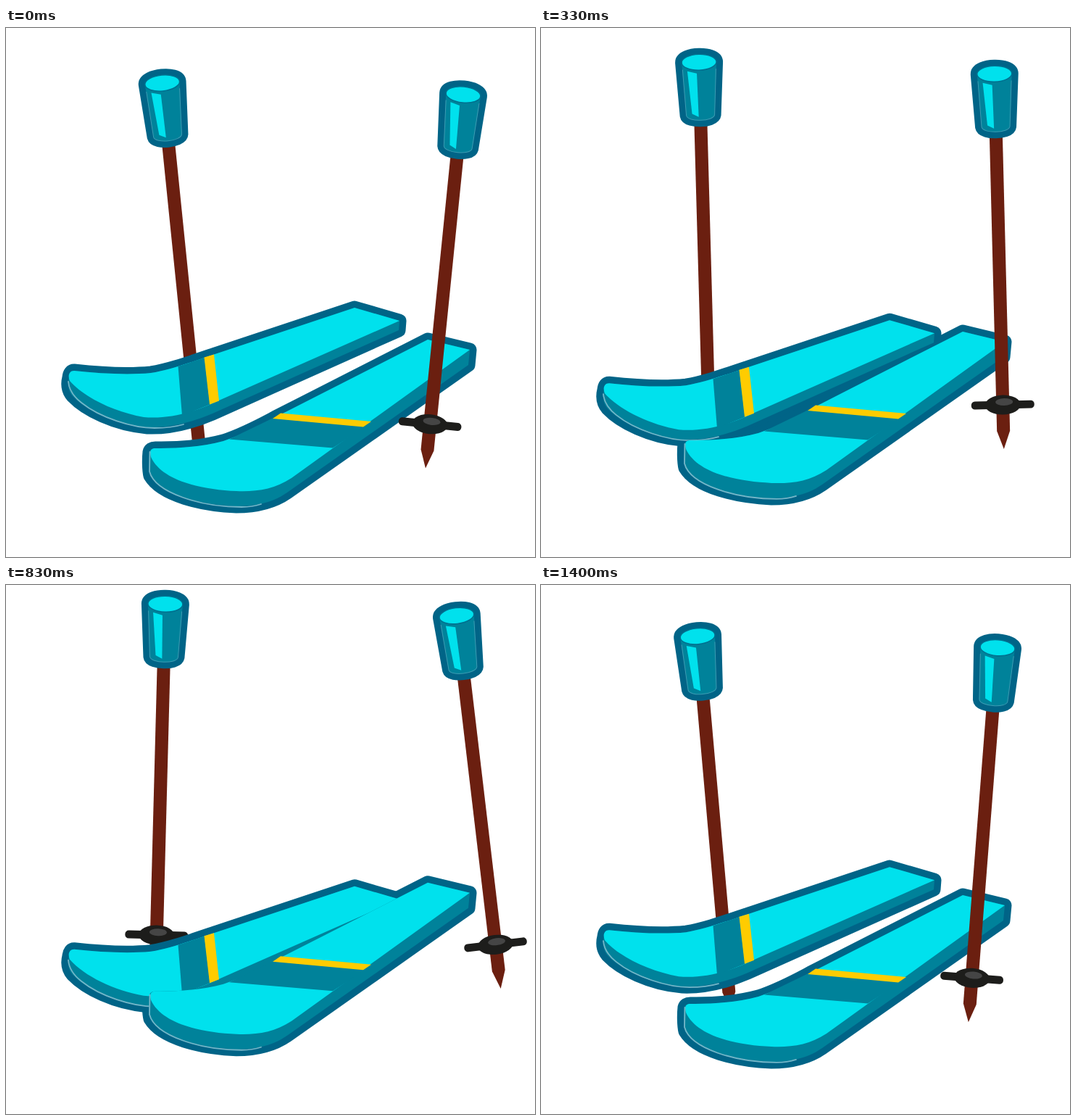
Write an HTML page that moves like this. It is 730 px wide and 730 px high and loops after 1.44 s.

```html
<!DOCTYPE html>
<html lang="en">
<head>
<meta charset="utf-8">
<title>Skis and poles</title>
<style>
  html, body { margin: 0; width: 100%; height: 100%; overflow: hidden; background: #fff; }
  svg { display: block; width: 100vw; height: 100vh; }
  .rim { fill: #006487; stroke: #006487; stroke-width: 19; stroke-linejoin: round; }
  .side { fill: #00829a; }
  .top { fill: #00e1ed; }
  .stripe { fill: #ffcc00; }
  .shine { fill: none; stroke: #74b6c8; stroke-width: 1.8; stroke-linecap: round; }
  .wood { fill: #6b1f10; }
  .basket { fill: #1d1d1b; }
</style>
</head>
<body>
<svg viewBox="0 0 730 730">
  <defs>
    <path id="bodyA" d="M94 473C130 477 170 479 200 476C225 472 250 463 290 449.500L481 386L543 404L542 417L285 532C250 547 220 552 195 551C150 547 110 527 92 508C85 500 85 490 87 482Q88 473 94 473Z"/>
    <path id="bodyB" d="M206 580C235 580.500 270 578 300 570C330 560 355 546 372 537L582 430L640 444L638 465L388 641C365 657 340 660 318 660C270 658 215 645 199 618C197 610 197 594 198 585Q199 580 206 580Z"/>
    <path id="grip" d="M-24 0C-24 -14 24 -14 24 0L19.500 73C18 82.500 -18 82.500 -19.500 73Z"/>

    <!-- upright pole, origin at the centre of the grip's top -->
    <g id="pole">
      <path class="wood" d="M-9 60H9V493L0 518L-9 493Z"/>
      <g class="basket">
        <rect x="-43.500" y="451.500" width="87" height="11" rx="5"/>
        <ellipse cy="457" rx="24.500" ry="13.500"/>
      </g>
      <ellipse cx="2" cy="453" rx="12" ry="5" fill="#454545"/>
      <use href="#grip" class="rim" style="stroke-width:18"/>
      <use href="#grip" class="side"/>
      <path class="shine" style="stroke:#3d9cb3;stroke-width:1" d="M-23 10L-19.500 73C-18 82.500 18 82.500 19.500 73L23 10"/>
      <ellipse class="top" rx="24" ry="11" stroke="#00708f" stroke-width="1.500"/>
      <path class="top" d="M-16.500 12L-3.500 15.500L-2.500 75.500L-11.500 71Z"/>
    </g>

    <g id="skiA">
      <use href="#bodyA" class="side"/>
      <path class="top" d="M94 473C130 477 170 479 200 476C225 472 250 463 290 449.500L481 386L543 404L287 517C255 532 220 540 190 537C150 530 108 510 88 487C85 480 87 473 94 473Z"/>
      <path class="side" d="M237.500 467L274 455L281.500 519.500L243 535Z"/>
      <path class="stripe" d="M273.500 454.500L287 450.500L294 514.500L281 519.500Z"/>
      <path class="shine" d="M86 488C87 500 95 510 104 517C130 538 175 552 205 552Q228 552 245 547"/>
    </g>

    <g id="skiB">
      <use href="#bodyB" class="side"/>
      <path class="top" d="M206 580C235 580.500 270 578 300 570C330 560 355 546 372 537L582 430L640 444L394 621C370 637 345 640 318 639C270 637 215 625 200 592C198 585 199 580 206 580Z"/>
      <path class="side" d="M308 567.500L368 538.500L496 550L451 579.500Z"/>
      <path class="stripe" d="M368 539L379 531.500L504 543L493 550.500Z"/>
      <path class="shine" d="M198.500 585L198 612C206 642 270 661 325 661Q340 661 352 657"/>
    </g>
  </defs>

  <use href="#pole" id="poleA"/>
  <g class="rim">
    <use href="#bodyA" class="a"/>
    <use href="#bodyB" class="b"/>
  </g>
  <use href="#skiA" class="a"/>
  <use href="#skiB" class="b"/>
  <use href="#pole" id="poleB"/>
</svg>
<script>
  const LOOP = 1440, STEP = 100 / 3, LAST = 42, PEAK = 21, END = 44;
  const $ = s => document.querySelectorAll(s);

  const place = (sel, value) =>
    $(sel).forEach(el => el.setAttribute('transform', value));

  // each pole turns about a point inside its grip
  const swing = (sel, x, y, arm, angle) =>
    place(sel, `translate(${x} ${y}) rotate(${angle}) translate(0 ${-arm})`);

  function draw(time) {
    const k = Math.min(LAST, Math.floor((time % LOOP + 4) / STEP));
    const u = k < PEAK ? k / PEAK : (END - k) / (END - PEAK);
    place('.a', `translate(0 ${36 * u})`);
    place('.b', `translate(0 ${-23.3 * u})`);
    swing('#poleA', 219, 108.8 - 60 * u, 33, -5.8 + 8.85 * u);
    swing('#poleB', 626.8, 133.8 - 60 * u, 42, 5.77 - 15.15 * u);
  }

  let start;
  function tick(now) {
    start ??= now;
    draw(now - start);
    requestAnimationFrame(tick);
  }
  draw(0);
  requestAnimationFrame(tick);
</script>
</body>
</html>
```
